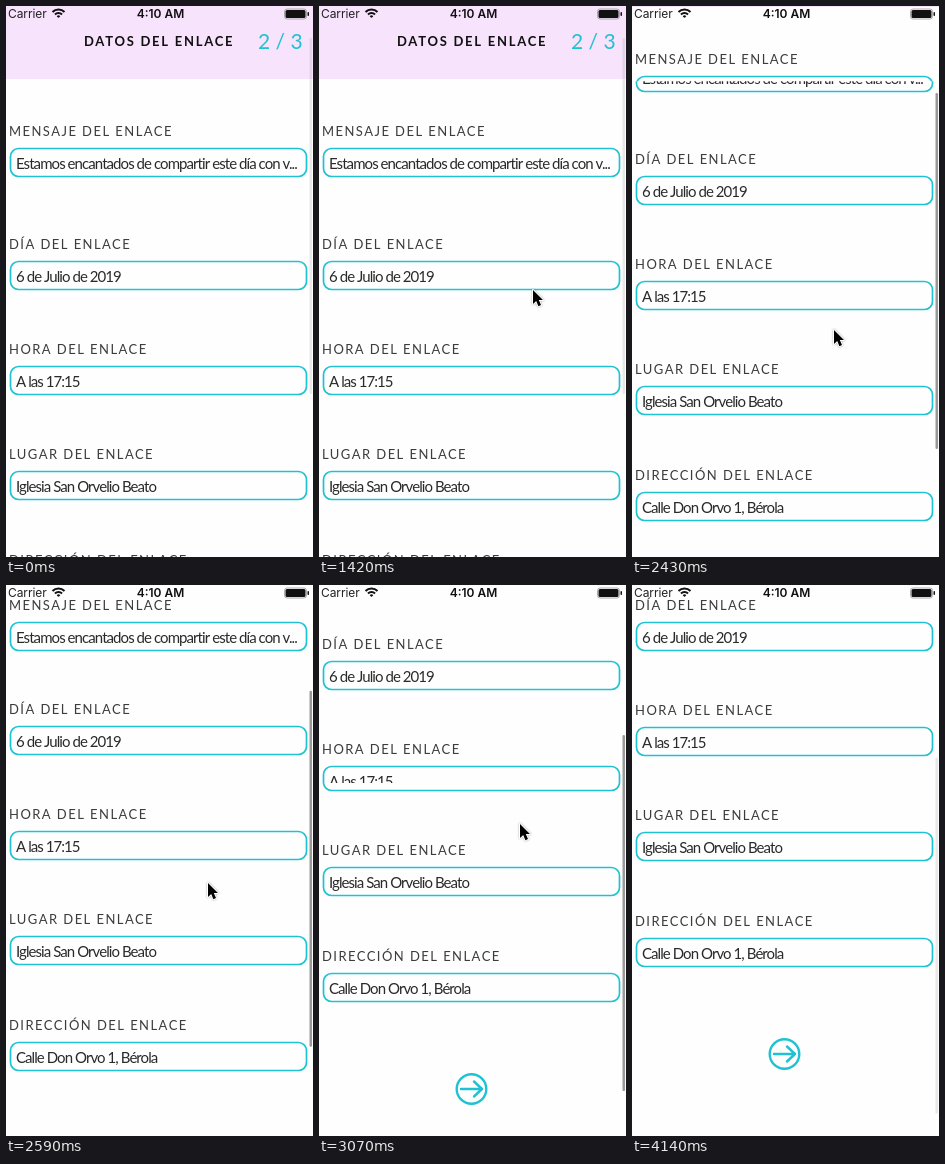
An HTML page with a canvas that plays this animation: 307x551 px, repeating every 4.62 s.

```html
<!DOCTYPE html>
<html lang="es">
<head>
<meta charset="utf-8">
<style>
  html, body { margin: 0; width: 100%; height: 100%; overflow: hidden; background: #fff; }
  canvas { display: block; width: 307px; height: 551px; }
</style>
</head>
<body>
<canvas id="stage" width="307" height="551"></canvas>
<script>
const W = 307, H = 551, LOOP = 4620;
const DRAG_START = 2050, RELEASE = 3660, EXIT = 4140;
const TEAL = '#1fc2d3', INK = '#2a2a2a';
const ctx = document.getElementById('stage').getContext('2d');

const fields = [
  ['MENSAJE DEL ENLACE', 'Estamos encantados de compartir este día con v...'],
  ['DÍA DEL ENLACE', '6 de Julio de 2019'],
  ['HORA DEL ENLACE', 'A las 17:15'],
  ['LUGAR DEL ENLACE', 'Iglesia San Orvelio Beato'],
  ['DIRECCIÓN DEL ENLACE', 'Calle Don Orvo 1, Bérola'],
];
const fieldTop = i => i ? Math.round(149.2 + 105.4 * i) : 142;

// Pointer moves: start, end, target position
const moves = [
  { from: 130, to: 650, x: 200, y: 222 },
  { from: 970, to: 1420, x: 214, y: 283 },
  { from: 1500, to: 1900, x: 208, y: 446 },
  { from: DRAG_START, to: 2430, x: 202, y: 323 },
  { from: 2430, to: 3430, x: 201, y: 217 },
  { from: RELEASE, to: EXIT, x: 262, y: 530 },
];

// Drag key points: the screen above the tear shows the page a little late
const drag = [
  { time: 2000, scroll: 0, lag: 0 },
  { time: 2430, scroll: 85, lag: 13 },
  { time: 2820, scroll: 156, lag: 4 },
  { time: 3070, scroll: 183, lag: 4 },
  { time: 3430, scroll: 217, lag: 0 },
  { time: RELEASE, scroll: 218, lag: 0 },
];

const clamp = v => Math.min(1, Math.max(0, v));
const progress = (t, from, to) => clamp((t - from) / (to - from));
const mix = (a, b, p) => a + (b - a) * p;

function pointerAt(t) {
  let x = 258, y = 514;
  for (const move of moves) {
    const p = progress(t, move.from, move.to);
    // The long drag slows down; the other moves ease at both ends
    const eased = move.from === 2430 ? 1 - (1 - p) ** 1.6 : p * p * (3 - 2 * p);
    x = mix(x, move.x, eased);
    y = mix(y, move.y, eased);
  }
  return [x, y];
}

function dragAt(t) {
  const state = { scroll: 0, lag: 0 };
  for (let i = 1; i < drag.length; i++) {
    const p = progress(t, drag[i - 1].time, drag[i].time);
    for (const key in state) state[key] += (drag[i][key] - drag[i - 1][key]) * p;
  }
  return state;
}

function text(str, x, y, font, color = INK, spacing = 0, align = 'left') {
  ctx.font = font;
  ctx.letterSpacing = spacing + 'px';
  ctx.textAlign = align;
  ctx.fillStyle = color;
  ctx.fillText(str, x, y);
}

function outline(path, color, width) {
  ctx.strokeStyle = color;
  ctx.lineWidth = width;
  ctx.stroke(path);
}

function roundRect(x, y, w, h, r) {
  const path = new Path2D();
  path.roundRect(x, y, w, h, r);
  return path;
}

const arrowButton = new Path2D('M142 687H163M155 679.5L163 687L155 694.5M167.3 687A14.8 14.8 0 1 1 137.7 687A14.8 14.8 0 1 1 167.3 687');
const pointer = new Path2D('M0 0V14L3.2 11L5.4 16.2L8 15.1L5.8 10.1H10Z');

function drawPage(scroll, top, bottom) {
  ctx.save();
  ctx.beginPath();
  ctx.rect(0, top, W, bottom - top);
  ctx.clip();
  ctx.translate(0, -Math.round(scroll));

  ctx.fillStyle = '#f7e3fc';
  ctx.fillRect(0, 0, W, 73);
  text('DATOS DEL ENLACE', 78, 40, 'bold 13px Lato, sans-serif', '#111', 1.75);
  text('2 / 3', 252, 43, '21px Lato, sans-serif', TEAL);

  fields.forEach(([label, value], i) => {
    const y = fieldTop(i);
    text(label, 3, y - 12, '13px Lato, sans-serif', '#3c3c3c', 1.45);
    outline(roundRect(4.5, y + .5, 296, 28, 8), TEAL, 1.7);
    text(value, 10, y + 21, '15px Lato, sans-serif', INK, -.93);
  });

  ctx.lineCap = ctx.lineJoin = 'round';
  outline(arrowButton, TEAL, 2.4);
  ctx.restore();
}

function drawStatusBar() {
  text('Carrier', 2, 12, '12px Inter, sans-serif', '#222', -.1);
  text('4:10 AM', 154.5, 12, '600 12px Inter, sans-serif', '#111', 0, 'center');

  for (let r = 1.5; r < 9; r += 3.5) {
    const arc = new Path2D();
    arc.arc(52.5, 12, r, -Math.PI * .75, -Math.PI * .25);
    outline(arc, '#111', 2);
  }

  outline(roundRect(278.5, 3, 22, 10, 2.5), '#999', .8);
  ctx.fillStyle = '#111';
  ctx.fill(roundRect(279.5, 4, 20, 8, 1.5));
  ctx.fill(roundRect(301.5, 6, 1.5, 4, .7));
}

function drawScrollBar(t, scroll) {
  const fadeIn = progress(t, 1950, DRAG_START), fadeOut = progress(t, RELEASE, EXIT);
  ctx.globalAlpha = mix(.22, 1, fadeIn - fadeOut);
  ctx.fillStyle = '#999';
  ctx.fill(roundRect(303.5, 32 + scroll * .645, 2.5, 356, 1.2));
  ctx.globalAlpha = 1;
}

function drawPointer(x, y) {
  ctx.save();
  ctx.translate(Math.round(x), Math.round(y) + 1);
  ctx.lineJoin = 'round';
  ctx.shadowColor = 'rgba(0, 0, 0, .4)';
  ctx.shadowBlur = 2;
  outline(pointer, '#fff', 2);
  ctx.shadowColor = 'transparent';
  ctx.fillStyle = '#000';
  ctx.fill(pointer);
  ctx.restore();
}

function draw(t) {
  const { scroll, lag } = dragAt(t);
  const tear = lag ? Math.max(0, 75 + (t - 2430) * .192) : 0;

  ctx.fillStyle = '#fefefe';
  ctx.fillRect(0, 0, W, H);
  drawPage(scroll - lag, 0, tear);
  drawPage(scroll, tear, H);
  drawStatusBar();
  drawScrollBar(t, scroll);
  if (t >= 130 && t < EXIT - 10) drawPointer(...pointerAt(t));
}

const began = performance.now();
function tick() {
  draw((performance.now() - began) % LOOP);
  requestAnimationFrame(tick);
}
tick();
</script>
</body>
</html>
```
